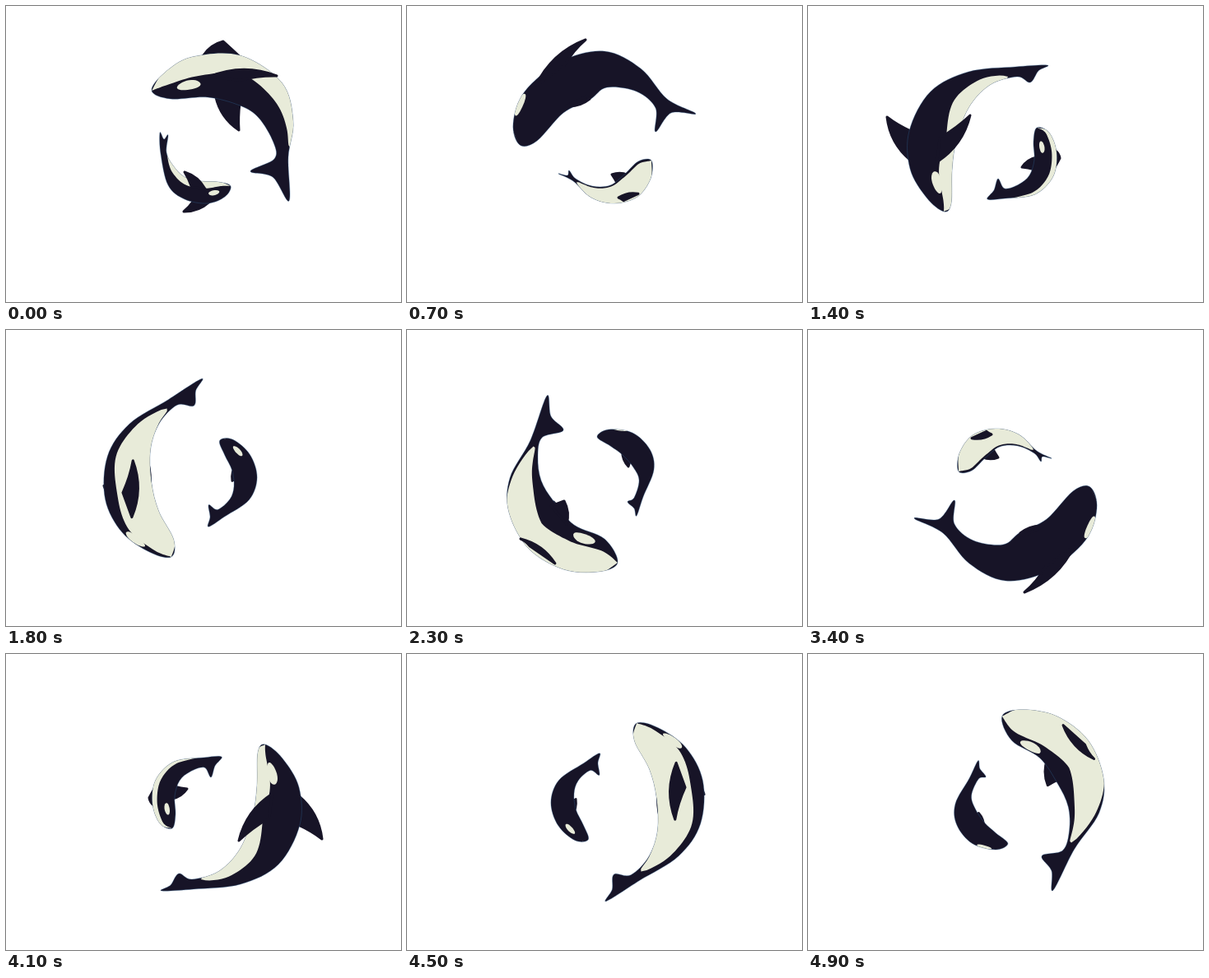
Animation, 480 px wide and 360 px high, one loop 5 s. Source, as an HTML page with a canvas:

```html
<!DOCTYPE html>
<html lang="en">
<head>
<meta charset="utf-8">
<title>Circling orcas</title>
<style>
html, body { margin: 0; width: 100%; height: 100%; overflow: hidden; background: #fff; }
canvas { display: block; width: 480px; height: 360px; }
</style>
</head>
<body>
<canvas id="stage" width="480" height="360"></canvas>
<script>
const ctx = document.getElementById('stage').getContext('2d');
const CX = 240, CY = 180, TAU = Math.PI * 2;
const HALF = 27, STEPS = 50, STEP_MS = 100; // half an orbit lasts 27 steps
const DARK = '#171427', PALE = '#e8ebd9', EDGE = 'rgba(50,100,150,.5)';

// Repeat rows [time, ...values] every half orbit; each repeat adds `gain`.
function scalars(rows, gain) {
  return [-1, 0, 1].flatMap(w => rows.map(([t, ...v]) =>
    ({ t: t + w * HALF, v: v.map((x, i) => x + w * gain[i]) })));
}

// Rows [time, x, y, ...] become radius and unbroken angle; each repeat is turned by 180 degrees.
function polar(rows) {
  let prev = null;
  return [-1, 0, 1].flatMap(w => rows.map(([t, ...n]) => {
    const v = [];
    for (let i = 0; i < n.length; i += 2) {
      const x = n[i] - CX, y = n[i + 1] - CY;
      let a = Math.atan2(y, x) + w * Math.PI;
      if (prev) a -= TAU * Math.round((a - prev[i + 1]) / TAU);
      v.push(Math.hypot(x, y), a);
    }
    prev = v;
    return { t: t + w * HALF, v };
  }));
}

function sample(track, u) {
  const i = track.findIndex(k => k.t > u) - 1;
  const [p, a, b, q] = [track[i - 1], track[i], track[i + 1], track[i + 2]];
  const d = b.t - a.t, s = (u - a.t) / d, s2 = s * s, s3 = s2 * s;
  return a.v.map((x, n) => {
    const y = b.v[n];
    const m0 = (y - p.v[n]) / (b.t - p.t) * d, m1 = (q.v[n] - x) / (q.t - a.t) * d;
    return (2 * s3 - 3 * s2 + 1) * x + (s3 - 2 * s2 + s) * m0 + (3 * s2 - 2 * s3) * y + (s3 - s2) * m1;
  });
}

function points(track, u, sign) {
  const v = sample(track, u), out = [];
  for (let i = 0; i < v.length; i += 2) {
    out.push([CX + sign * v[i] * Math.cos(v[i + 1]), CY + sign * v[i] * Math.sin(v[i + 1])]);
  }
  return out;
}

const fin = (over, rows) => ({
  over,
  tip: polar(rows.map(r => r.slice(0, 3))),
  base: scalars(rows.map(r => [r[0], r[3]]), [0])
});

// Body rows: time, nose, then outer and inner edge in turn, then fluke, notch, fluke.
const adultBody = polar([
  [0, 177,103, 193,81, 200,113, 226,62, 245,111, 284,60, 284,121, 335,93, 307,136, 349,140, 325,166,
    343,184, 326,186, 344,237, 324,208, 297,201],
  [7, 137,169, 129,143, 158,164, 143,104, 190,130, 188,67, 222,114, 240,55, 243,99, 284,76, 279,104,
    316,113, 302,124, 351,131, 321,130, 302,153],
  [14, 165,250, 144,233, 174,240, 124,198, 175,200, 123,152, 180,165, 149,104, 195,124, 195,80, 221,96,
    252,74, 254,86, 291,72, 280,79, 270,93],
  [23, 256,283, 232,294, 240,254, 190,291, 203,237, 148,266, 178,208, 124,222, 163,183, 125,180, 159,155,
    150,134, 164,131, 170,80, 175,105, 190,122]
]);

const calfBody = polar([
  [0, 273,219, 266,232, 258,214, 245,240, 237,213, 217,235, 217,208, 197,218, 203,194, 188,180, 195,178,
    187,154, 192,162, 197,157],
  [7, 297,188, 296,210, 281,189, 280,232, 265,204, 252,240, 247,218, 224,233, 225,219, 202,213, 205,210,
    184,204, 195,206, 197,200],
  [14, 278,148, 293,154, 274,165, 302,178, 275,187, 298,207, 269,206, 276,229, 256,217, 240,234, 239,222,
    218,235, 226,224, 231,210],
  [23, 231,130, 245,121, 247,141, 274,125, 262,152, 295,145, 275,167, 300,170, 282,183, 287,203, 276,204,
    279,226, 276,217, 268,209]
]);

// Roll rows: time, belly direction and rear twist in degrees (+90 faces outwards).
const adult = {
  body: adultBody,
  roll: scalars([[0, 64, 0], [7, 142, 0], [14, 278, 30], [23, 405, -40]], [360, 0]),
  belly: [60, 60, 60, 48, 55, 45, 45], end: 5.65,
  eyes: [-82, 71], eye: [1.62, 0.33, 15],
  root: [2.25, 3],
  // Fin rows: time, tip x y, place of the base across the body.
  fins: [
    fin(u => u >= 23 || u < 9, [[0, 329, 85, 0], [7, 217, 41, 0.8], [14, 180, 105, 0.3], [23, 191, 208, -0.8]]),
    fin(u => u >= 7 && u < 25, [[0, 264, 43, 0.95], [7, 222, 113, -0.8], [14, 197, 133, -0.3], [23, 138, 254, 0.9]]),
    fin(() => false, [[0, 283, 151, -0.9], [7, 220, 80, 0], [14, 96, 135, 0.9], [23, 178, 209, -0.7]])
  ]
};

const calf = {
  body: calfBody,
  roll: scalars([[0, -85, 0], [7, 12, 0], [14, 100, 0], [23, 184, 0]], [360, 0]),
  belly: [50, 60, 65, 65, 60, 60], end: 4.8,
  eyes: [94, -112], eye: [1.5, 0.3, 14],
  root: [1.9, 2.6],
  fins: [
    fin(u => u < 14 || u >= 24, [[0, 217, 202, -0.3], [7, 257, 233, 0.85], [14, 306, 185, 0.9], [23, 269, 166, -0.8]]),
    fin(() => false, [[0, 216, 250, 0.9], [7, 249, 205, -0.8], [14, 260, 196, -0.8], [23, 280, 146, 0.2]])
  ]
};

function smooth(pts) {
  const n = pts.length, at = i => pts[(i + n) % n];
  const path = new Path2D();
  path.moveTo(...pts[0]);
  for (let i = 0; i < n; i++) {
    const [a, b, c, d] = [at(i - 1), at(i), at(i + 1), at(i + 2)];
    path.bezierCurveTo(b[0] + (c[0] - a[0]) / 6, b[1] + (c[1] - a[1]) / 6,
      c[0] - (d[0] - b[0]) / 6, c[1] - (d[1] - b[1]) / 6, c[0], c[1]);
  }
  path.closePath();
  return path;
}

function polygon(pts) {
  const path = new Path2D();
  pts.forEach(p => path.lineTo(...p));
  path.closePath();
  return path;
}

// Point on an open spline through pts.
function along(pts, s) {
  const last = pts.length - 1;
  const i = Math.min(last - 1, Math.floor(s)), f = s - i;
  const a = pts[Math.max(0, i - 1)], b = pts[i], c = pts[i + 1], d = pts[Math.min(last, i + 2)];
  return [0, 1].map(k => b[k] + f / 2 * (c[k] - a[k] + f * (2 * a[k] - 5 * b[k] + 4 * c[k] - d[k]
    + f * (3 * (b[k] - c[k]) + d[k] - a[k]))));
}

const mix = (a, b, f) => [a[0] + (b[0] - a[0]) * f, a[1] + (b[1] - a[1]) * f];

// Sideways place of a body angle; angles on the far side land on the rim.
function across(deg) {
  const v = Math.sin(Math.max(-90, Math.min(90, deg)) * Math.PI / 180);
  return v * (1 + 0.12 * v ** 4);
}

const wrap = deg => deg - 360 * Math.round(deg / 360);

function bellyPath(orca, place, roll, twist) {
  const low = [], high = [], widths = orca.belly.map(w => [w, 0]);
  for (let n = 0; n <= 60; n++) {
    const s = orca.end * n / 60;
    const taper = Math.max(0, (s - orca.end + 0.8) / 0.8);
    const w = along(widths, s)[0] * Math.sqrt(1 - Math.min(1, taper * taper));
    const mid = wrap(roll + twist * Math.max(0, (s - 3) / 2));
    low.push(place(s, across(mid - w)));
    high.unshift(place(s, across(mid + w)));
  }
  return polygon([...low, ...high]);
}

function eyePath([s, length, width], place, deg) {
  return polygon(Array.from({ length: 32 }, (_, i) => {
    const k = i / 32 * TAU;
    return place(s + length * Math.cos(k), across(deg + width * Math.sin(k)));
  }));
}

function finPath(front, tip, back) {
  const dx = tip[0] - front[0], dy = tip[1] - front[1];
  const side = Math.sign(dx * (back[1] - front[1]) - dy * (back[0] - front[0])) || 1;
  const bend = (p, f) => [p[0] + dy * side * f, p[1] - dx * side * f];
  const path = new Path2D();
  path.moveTo(...front);
  path.quadraticCurveTo(...bend(mix(front, tip, 0.5), 0.2), ...tip);
  path.quadraticCurveTo(...bend(mix(tip, back, 0.5), 0.04), ...back);
  path.closePath();
  return path;
}

function paint(path, fill, line, width) {
  ctx.fillStyle = fill;
  ctx.fill(path);
  if (!line) return;
  ctx.strokeStyle = line;
  ctx.lineWidth = width;
  ctx.lineJoin = 'round';
  ctx.stroke(path);
}

function drawOrca(orca, u, sign) {
  const pts = points(orca.body, u, sign);
  const flukes = pts.slice(-3), sides = pts.slice(1, -3);
  const outer = [pts[0], ...sides.filter((_, i) => i % 2 === 0)];
  const inner = [pts[0], ...sides.filter((_, i) => i % 2)];
  const place = (s, v) => mix(along(inner, s), along(outer, s), (v + 1) / 2);
  const body = smooth([...outer, ...flukes, ...inner.slice(1).reverse()]);
  const [roll, twist] = sample(orca.roll, u);

  const drawFins = over => orca.fins.filter(f => f.over(u) === over).forEach(f => {
    const [tip] = points(f.tip, u, sign), [v] = sample(f.base, u);
    const [front, back] = orca.root.map(s => place(s, v));
    paint(finPath(front, tip, back), DARK, DARK, 3);
  });

  drawFins(false);
  paint(body, DARK, EDGE, 0.7);
  ctx.save();
  ctx.clip(body);
  paint(bellyPath(orca, place, roll, twist), PALE);
  orca.eyes.forEach(e => paint(eyePath(orca.eye, place, wrap(roll + e)), PALE));
  ctx.restore();
  drawFins(true);
}

const start = performance.now();
function render(now) {
  const step = Math.floor(Math.max(0, now - start) / STEP_MS) % STEPS;
  const u = step % HALF, sign = step < HALF ? 1 : -1;
  ctx.clearRect(0, 0, 480, 360);
  drawOrca(adult, u, sign);
  drawOrca(calf, u, sign);
  requestAnimationFrame(render);
}
render(start);
</script>
</body>
</html>
```
